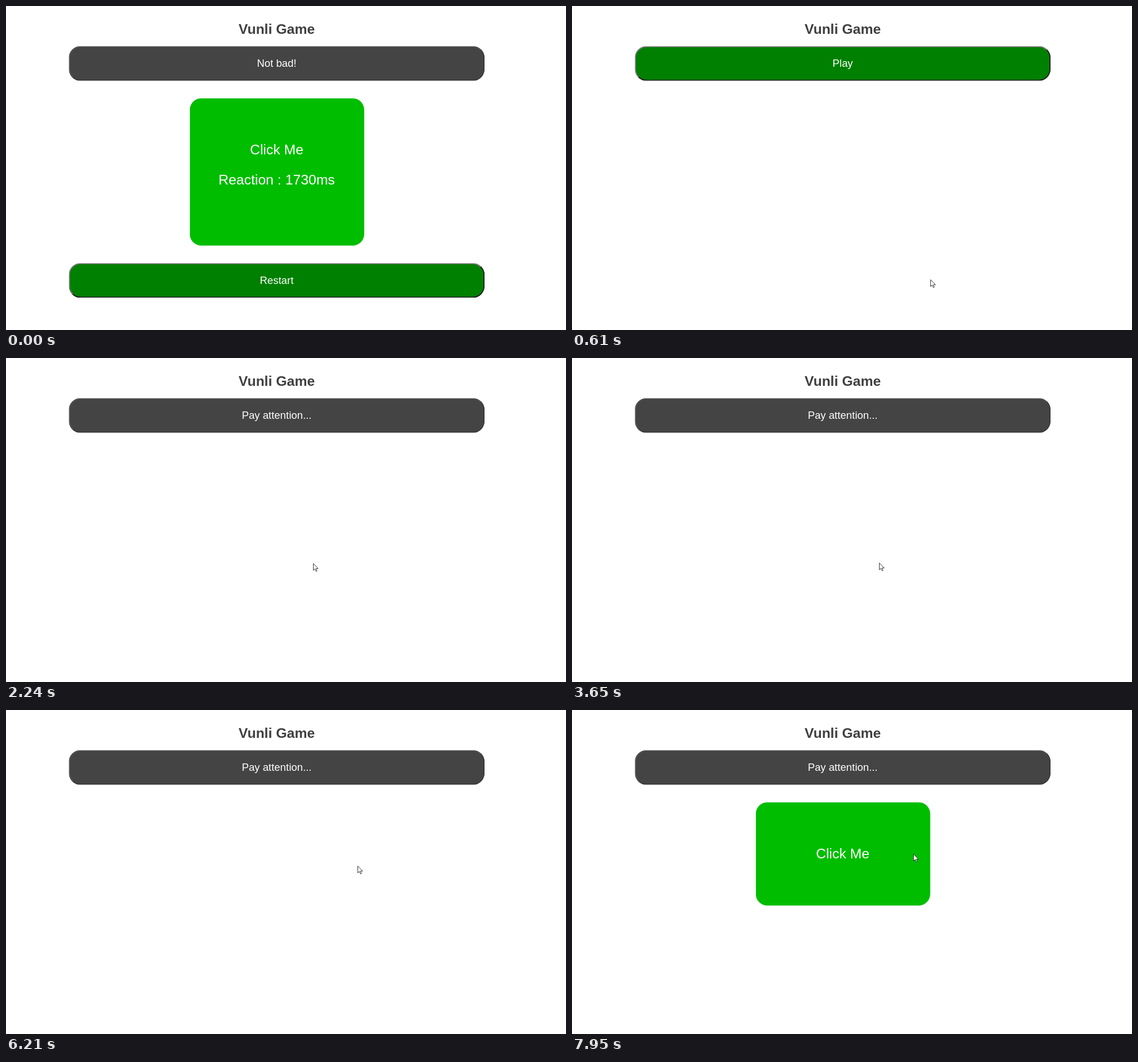
Animation, 983 px wide and 570 px high, one loop 8000 ms. Source, as an HTML page:

```html
<!DOCTYPE html>
<html lang="en">
<head>
<meta charset="utf-8">
<title>Reaction test</title>
<style>
html, body { margin: 0; width: 100%; height: 100%; overflow: hidden; background: #fff; }
body { position: relative; font-family: "Liberation Sans", Arial, sans-serif; }

/* The page is laid out in whole pixels and shown slightly enlarged. */
.page { position: absolute; left: 0; top: 0; width: 963px; height: 558px; transform: scale(1.0208); transform-origin: 0 0; }

h1, .bar, .panel, .panel p, .cursor { position: absolute; margin: 0; box-sizing: border-box; text-align: center; }
h1 { left: 108px; top: 26px; width: 715px; font: bold 24px/27px "Liberation Sans", Arial, sans-serif; color: #404040; }

.bar {
  left: 108px; top: 69px; width: 715px; height: 60px;
  border: 2px solid; border-color: #767676 #212121 #212121 #767676; border-radius: 20px;
  background: #008000; color: #fff; font-size: 18px; line-height: 56px;
}
.bar.off { border-color: #535353 #3a3a3a #3a3a3a #535353; background: #444; }
.bar.low { top: 443px; }

.panel { left: 315.5px; top: 159px; width: 300px; height: 178px; border-radius: 20px; background: #00bd00; }
.panel.tall { height: 254px; }
.panel p { left: 0; top: 75px; width: 100%; color: #fff; font-size: 24px; line-height: 27px; }
.panel p + p { top: 127px; }

/* Screens switch hard; the pointer moves in small jumps. */
.result, .start, .wait, .target { animation: 8s step-end infinite; }
.result { animation-name: result; }
.start { animation-name: start; }
.wait { animation-name: wait; }
.target { animation-name: target; }
@keyframes result { 0% { opacity: 1 } 7.625%, 100% { opacity: 0 } }
@keyframes start { 0% { opacity: 0 } 7.625% { opacity: 1 } 16.125%, 100% { opacity: 0 } }
@keyframes wait { 0% { opacity: 0 } 16.125%, 100% { opacity: 1 } }
@keyframes target { 0% { opacity: 0 } 98.5%, 100% { opacity: 1 } }

.cursor { left: 0; top: 0; width: 11px; height: 17px; overflow: visible; animation: move 8s steps(1) infinite; }
@keyframes move {
  0% { transform: translate(844px, 600px) }
  .875% { transform: translate(844px, 556px); animation-timing-function: steps(2) }
  2.5625% { transform: translate(740px, 512px); animation-timing-function: steps(2) }
  4.25% { transform: translate(660px, 487px); animation-timing-function: steps(2) }
  5.9375% { transform: translate(629px, 481px) }
  9.2875% { transform: translate(629px, 481px); animation-timing-function: steps(2) }
  11% { transform: translate(612px, 430px); animation-timing-function: steps(2) }
  12.75% { transform: translate(560px, 270px); animation-timing-function: steps(2) }
  14.375% { transform: translate(515px, 125px) }
  15.25% { transform: translate(507px, 94px) }
  16.9125% { transform: translate(507px, 94px) }
  17.75% { transform: translate(508px, 112px); animation-timing-function: steps(2) }
  19.5% { transform: translate(519px, 233px); animation-timing-function: steps(3) }
  22.125% { transform: translate(534px, 318px); animation-timing-function: steps(2) }
  23.75% { transform: translate(542px, 352px); animation-timing-function: steps(2) }
  25.5% { transform: translate(542px, 363px) }
  28% { transform: translate(539px, 361px) }
  33% { transform: translate(540px, 360px) }
  45.625% { transform: translate(539px, 360px) }
  58% { transform: translate(539px, 360px); animation-timing-function: steps(4) }
  61.5% { transform: translate(537px, 358px) }
  67.25% { transform: translate(535px, 358px) }
  68.875% { transform: translate(535px, 358px); animation-timing-function: steps(3) }
  71.5% { transform: translate(550px, 345px); animation-timing-function: steps(3) }
  74.125% { transform: translate(585px, 315px); animation-timing-function: steps(2) }
  75.875% { transform: translate(613px, 291px) }
  76.75% { transform: translate(619px, 282px) }
  77.625% { transform: translate(617px, 274px); animation-timing-function: steps(2) }
  79.375% { transform: translate(588px, 242px); animation-timing-function: steps(2) }
  81.125% { transform: translate(562px, 237px); animation-timing-function: steps(3) }
  83.75% { transform: translate(540px, 258px); animation-timing-function: steps(3) }
  86.375% { transform: translate(545px, 284px); animation-timing-function: steps(2) }
  88.125% { transform: translate(560px, 286px); animation-timing-function: steps(2) }
  89.875% { transform: translate(575px, 280px); animation-timing-function: steps(7) }
  95.875% { transform: translate(610px, 266px); animation-timing-function: steps(4) }
  99.375%, 100% { transform: translate(599px, 253px) }
}
</style>
</head>
<body>
<div class="page">
  <h1>Vunli Game</h1>
  <div class="result">
    <div class="bar off">Not bad!</div>
    <div class="panel tall"><p>Click Me</p><p>Reaction : 1730ms</p></div>
    <div class="bar low">Restart</div>
  </div>
  <div class="start"><div class="bar">Play</div></div>
  <div class="wait"><div class="bar off">Pay attention...</div></div>
  <div class="target"><div class="panel"><p>Click Me</p></div></div>
</div>

<svg class="cursor" viewBox="0 0 11 17">
  <path d="M.5 .6V12.6L3.3 10L5.2 14.4L7 13.6L5.2 9.4H9Z" fill="#fff" stroke="#222" stroke-width=".9"/>
</svg>
</body>
</html>
```
